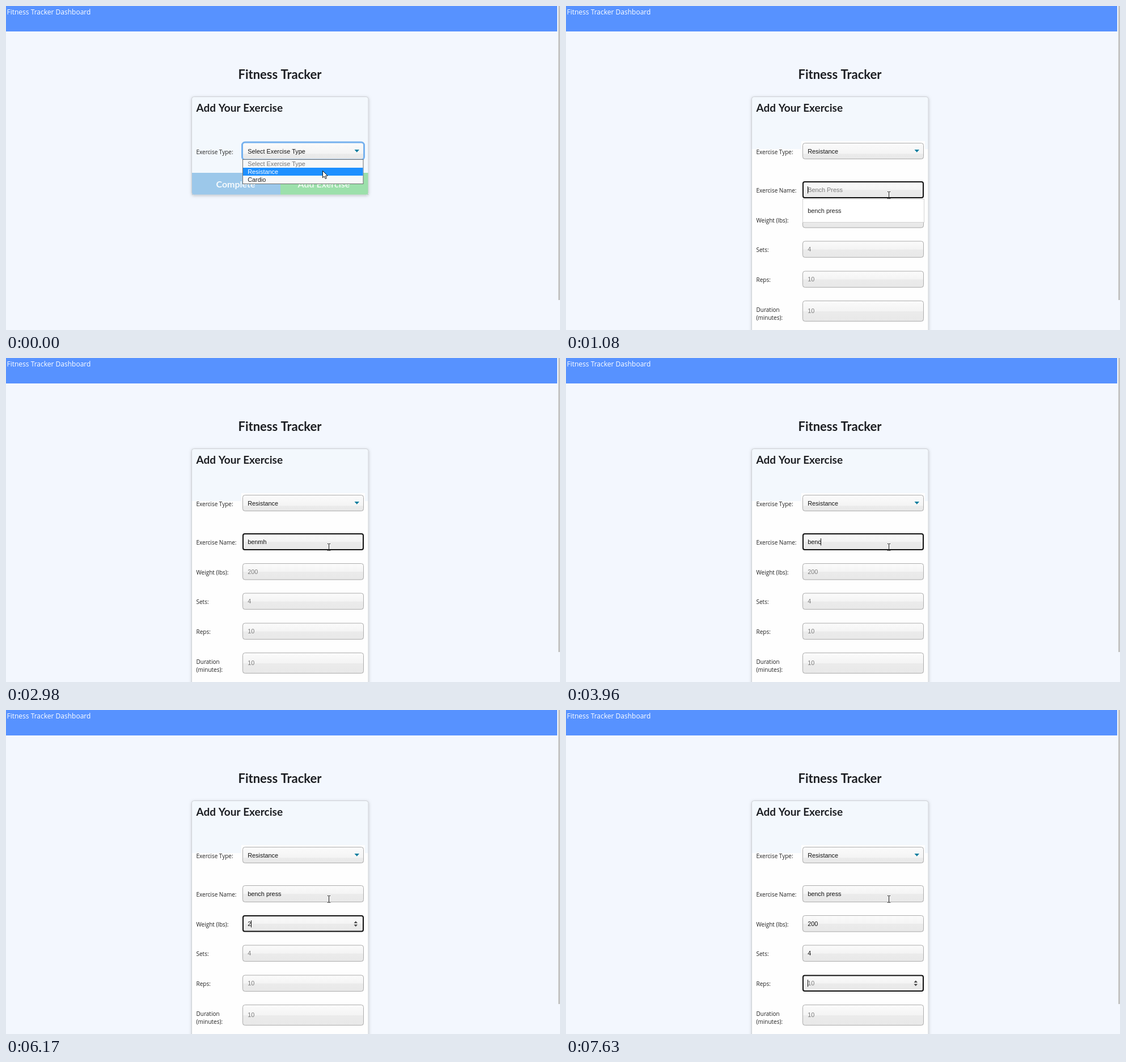
An HTML page with a canvas for the animation above (8 s loop, 977x573 px).

```html
<!DOCTYPE html>
<html lang="en">
<head>
<meta charset="utf-8">
<title>Fitness form</title>
<style>
html, body { margin: 0; width: 100%; height: 100%; overflow: hidden; background: #f3f7fe; }
canvas { display: block; }
</style>
</head>
<body>
<canvas id="stage" width="977" height="573"></canvas>
<script>
const ctx = document.getElementById('stage').getContext('2d');
const LOOP = 8000;
const FIELD_FONT = '10.9px "Liberation Sans", Arial, sans-serif';
const LABEL_FONT = '10px "Open Sans", "Noto Sans", sans-serif';
const LEFT = 417, WIDTH = 214, TEXT_X = 426.2;
const PAGE = '#f3f7fe';

const fields = [
  { key: 'name', hint: 'Bench Press', top: 310, h: 30, labels: ['Exercise Name:'] },
  { key: 'weight', hint: '200', top: 363, h: 29.5, labels: ['Weight (lbs):'], number: true },
  { key: 'sets', hint: '4', top: 415.5, h: 29.5, labels: ['Sets:'], number: true },
  { key: 'reps', hint: '10', top: 468.5, h: 29.5, labels: ['Reps:'], number: true },
  { key: 'time', hint: '10', top: 521, h: 37, labels: ['Duration', '(minutes):'] }
];

// Each step changes only the listed values.
const steps = [
  [0, { open: true, focus: 'type', caret: false, pointer: 'arrow', x: 558, y: 291 }],
  [290, { open: false, x: 564, y: 304 }],
  [410, { pointer: 'beam', x: 568, y: 326 }],
  [530, { x: 569, y: 333 }],
  [680, { y: 334 }],
  [1080, { focus: 'name', caret: true, suggest: true, repainted: true }],
  [1610, { caret: false }],
  [2010, { name: 'be', caret: true, suggest: false }],
  [2400, { name: 'ben' }],
  [2530, { name: 'benmh' }],
  [2980, { caret: false }],
  [3100, { name: 'benm' }],
  [3390, { name: 'ben' }],
  [3540, { caret: true }],
  [3960, { name: 'benc' }],
  [4080, { name: 'bench' }],
  [4230, { name: 'bench ' }],
  [4660, { name: 'bench pr' }],
  [4940, { name: 'bench pre' }],
  [5090, { name: 'bench pres' }],
  [5370, { name: 'bench press' }],
  [5490, { focus: 'weight' }],
  [6050, { caret: false }],
  [6170, { weight: '2', caret: true }],
  [6460, { weight: '20' }],
  [6610, { weight: '200' }],
  [6760, { focus: 'sets' }],
  [7190, { caret: false }],
  [7480, { sets: '4', caret: true }],
  [7630, { focus: 'reps' }]
];

function stateAt(time) {
  const state = {};
  for (const [start, change] of steps) if (start <= time) Object.assign(state, change);
  return state;
}

function rect(x, y, w, h, color) {
  ctx.fillStyle = color;
  ctx.fillRect(x, y, w, h);
}

function text(str, x, y, font, color, align = 'left') {
  ctx.font = font;
  ctx.fillStyle = color;
  ctx.textAlign = align;
  ctx.fillText(str, x, y);
}

function roundPath(x, y, w, h, r) {
  ctx.beginPath();
  ctx.roundRect(x, y, w, h, r);
}

function outline(x, y, w, h, r, line, color) {
  roundPath(x + line / 2, y + line / 2, w - line, h - line, r);
  ctx.lineWidth = line;
  ctx.strokeStyle = color;
  ctx.stroke();
}

function polygon(points, color) {
  ctx.beginPath();
  points.forEach(([x, y]) => ctx.lineTo(x, y));
  ctx.closePath();
  ctx.fillStyle = color;
  ctx.fill();
}

function glossyBox(y, h, split) {
  const g = ctx.createLinearGradient(0, y, 0, y + h);
  g.addColorStop(0, '#fbfbfb');
  g.addColorStop(split, '#f4f4f4');
  g.addColorStop(split + 0.02, '#ebebeb');
  g.addColorStop(1, '#e8e8e8');
  roundPath(LEFT, y, WIDTH, h, 4);
  ctx.fillStyle = g;
  ctx.fill();
}

function drawPage() {
  rect(0, 0, 977, 573, PAGE);
  rect(0, 0, 972, 45, '#5792ff');
  rect(974, 0, 3, 520, '#c4c4c4');
  text('Fitness Tracker Dashboard', 1.5, 15, '12px "Open Sans", "Noto Sans", sans-serif', '#fff');
  text('Fitness Tracker', 483, 129, 'bold 22px Lato, sans-serif', '#1c1e22', 'center');
}

function drawCard(state) {
  const h = state.open ? 174 : 440;
  ctx.save();
  ctx.shadowColor = 'rgba(0,0,0,.22)';
  ctx.shadowBlur = 5;
  ctx.shadowOffsetY = 1;
  roundPath(327.5, 160.5, 312, h, 4);
  ctx.fillStyle = '#f3f8fd';
  ctx.fill();
  ctx.restore();
  if (state.open) {
    const font = 'bold 16px Lato, sans-serif';
    rect(328, 295, 156, 39, '#9cc8ea');
    rect(484, 295, 155, 39, '#9ce0ab');
    text('Complete', 405, 321, font, '#f5fafd', 'center');
    text('Add Exercise', 560.5, 321, font, '#ebf9ee', 'center');
  } else {
    rect(328, 253, 311, 320, '#fefefe');
    if (state.repainted) rect(415, 239, 218, 15, '#fefefe');
  }
  outline(327, 160, 312.5, h + 0.5, 4, 1, '#cfd2d6');
  text('Add Your Exercise', 335.5, 187, 'bold 19px Lato, sans-serif', '#1c1e22');
}

function drawSelect(state) {
  text('Exercise Type:', 335.5, 261.5, LABEL_FONT, '#222');
  glossyBox(242, 29, 0.66);
  if (state.focus === 'type') outline(415, 239.5, 218, 34, 5, 3, '#76b1ee');
  else outline(LEFT, 242, WIDTH, 29, 4, 1, '#acacac');
  text(state.open ? 'Select Exercise Type' : 'Resistance', TEXT_X, 261, FIELD_FONT, '#111');
  polygon([[614.5, 254], [623, 254], [618.75, 258.7]], '#007c9e');
}

function drawMenu() {
  rect(LEFT, 271, 213.5, 44, '#707070');
  rect(LEFT + 1, 272, 211.5, 42, '#f7f8f9');
  rect(LEFT + 1, 286, 211.5, 14, '#1e90ff');
  text('Select Exercise Type', TEXT_X, 283, FIELD_FONT, '#757575');
  text('Resistance', TEXT_X, 297, FIELD_FONT, '#fff');
  text('Cardio', TEXT_X, 311, FIELD_FONT, '#222');
}

function drawField(field, state) {
  const { key, top, h } = field;
  const value = state[key] || '';
  const middle = top + h / 2;
  const base = Math.round(middle + 3.8);
  const focused = state.focus === key;

  field.labels.forEach((label, i) =>
    text(label, 335.5, (field.labels.length > 1 ? 540.5 : base + 0.5) + i * 14.7, LABEL_FONT, '#222'));
  glossyBox(top, h, 0.5);
  if (focused) outline(LEFT, top, WIDTH, h, 3, 2, '#101010');
  else outline(LEFT, top, WIDTH, h, 4, 1, '#acacac');
  text(value || field.hint, TEXT_X, base, FIELD_FONT, value ? '#111' : '#7d7d7d');

  if (!focused) return;
  if (state.caret) {
    const x = Math.floor(TEXT_X + ctx.measureText(value).width);
    rect(x, base - 10, 1, 12.5, '#111');
  }
  if (field.number) {
    const y = Math.round(middle);
    polygon([[613.5, y - 1], [620, y - 1], [616.75, y - 4.7]], '#444');
    polygon([[613.5, y + 1.5], [620, y + 1.5], [616.75, y + 5.2]], '#444');
  }
}

function drawSuggestion() {
  rect(LEFT, 341, 215, 42, '#d2d2d2');
  rect(LEFT + 1, 342, 213, 40, '#fff');
  text('bench press', TEXT_X, 366, FIELD_FONT, '#222');
}

function drawPointer({ pointer, x, y }) {
  if (pointer === 'beam') {
    rect(x, y - 5, 1, 11, '#222');
    for (const edge of [y - 6, y + 6]) {
      rect(x - 2, edge, 2, 1, '#222');
      rect(x + 1, edge, 2, 1, '#222');
    }
    return;
  }
  const tip = [[0, 0], [0, 12.2], [2.8, 9.7], [4.8, 14], [6.8, 13.1], [4.9, 8.9], [8.7, 8.7]];
  polygon(tip.map(([dx, dy]) => [x + 0.5 + dx, y + 0.5 + dy]), '#fff');
  ctx.lineWidth = 1;
  ctx.strokeStyle = '#111';
  ctx.stroke();
}

function draw(time) {
  const state = stateAt(time);
  drawPage();
  drawCard(state);
  drawSelect(state);
  if (state.open) drawMenu();
  else fields.forEach(field => drawField(field, state));
  if (state.suggest) drawSuggestion();
  drawPointer(state);
}

const begin = performance.now();
function tick() {
  draw((performance.now() - begin) % LOOP);
  requestAnimationFrame(tick);
}
tick();
</script>
</body>
</html>
```
